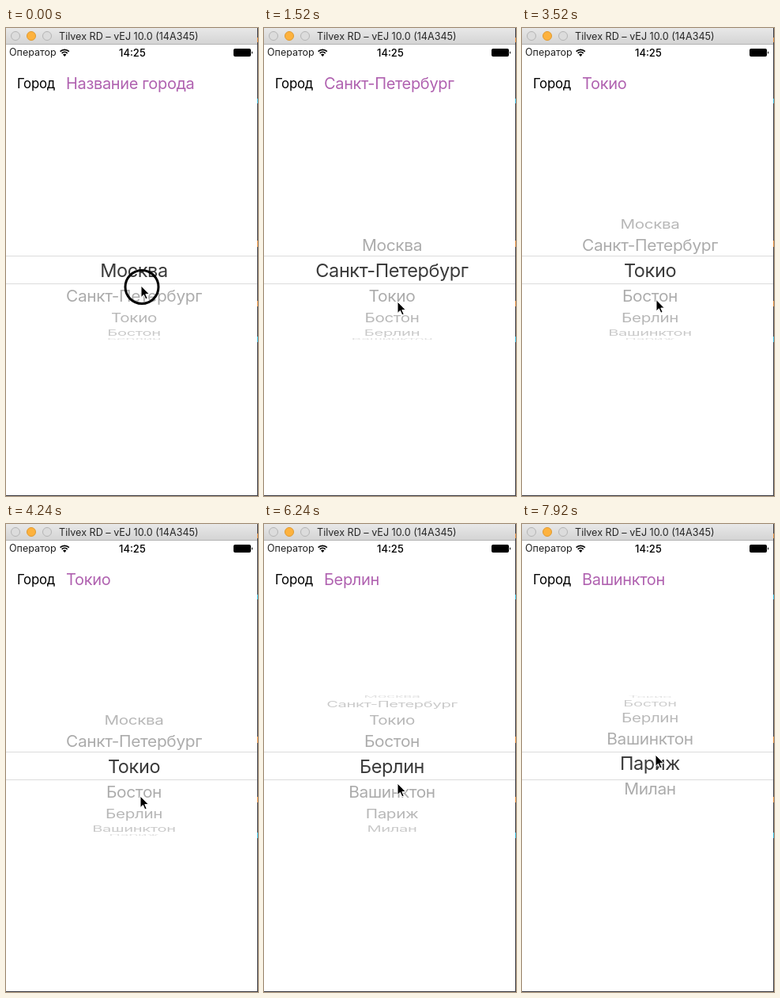
These frames come from a looping animation (319 by 590 pixels, 8000 ms). An HTML page:

```html
<!DOCTYPE html>
<html lang="ru">
<head>
<meta charset="utf-8">
<style>
html, body { margin: 0; width: 100%; height: 100%; overflow: hidden; background: #fff; }
body { position: relative; font-family: Inter, Roboto, sans-serif; color: #000; }
svg, .text, .wheel, .lens, .row { position: absolute; }
svg { left: 0; top: 0; }
.text { transform: translateY(-50%); white-space: nowrap; line-height: 1; }
.wheel { left: 0; top: 216px; width: 318px; height: 177px; overflow: hidden; }
.lens { left: 0; top: 287px; width: 318px; height: 34px; overflow: hidden; background: #fff;
  border: solid #dcdcdc; border-width: 1px 0; }
.row { left: 162px; white-space: nowrap; line-height: 1; font-size: 21px; letter-spacing: -.017em; }
.lens .row { font-size: 23.5px; color: #3a3a3a; }
#city { left: 76px; top: 69.5px; font-size: 20px; color: #b062b0; letter-spacing: -.017em; }
</style>
</head>
<body>
<svg width="319" height="590">
  <defs><linearGradient id="bar" x2="0" y2="1"><stop stop-color="#e8e8e8"/><stop offset="1" stop-color="#d4d4d4"/></linearGradient></defs>
  <path d="M0 0H318V20H0Z" fill="url(#bar)"/>
  <path d="M0 20.5H318" stroke="#b4b4b4"/>
  <g fill="#dcdcdc" stroke="#b5b5b5">
    <circle cx="12" cy="10" r="5.5"/>
    <circle cx="32" cy="10" r="5.5" fill="#fdb23e" stroke="#e09a30"/>
    <circle cx="52" cy="10" r="5.5"/>
  </g>
  <path d="M318.5 0V590M0 589.5H319" stroke="#3a3a42"/>
  <path d="M318.5 12v6M318.5 268v8M318.5 344v7" stroke="#e08a3c"/>
  <path d="M318.5 89v6M318.5 389v7" stroke="#2fb4d8"/>
  <path d="M68.6 29.6a8 8 0 0 1 11.2 0M70.7 31.9a5 5 0 0 1 7 0" fill="none" stroke="#000" stroke-width="1.7"/>
  <path d="M74.2 36l-2.2-2.4a3.2 3.2 0 0 1 4.4 0z"/>
  <rect x="288" y="26" width="22" height="10" rx="2"/>
  <path d="M311 29.2a2 2 0 0 1 0 3.6z"/>
</svg>
<div class="text" style="left:67px;top:10.5px;font-size:12.6px;color:#262626">Tilvex RD – vEJ 10.0 (14A345)</div>
<div class="text" style="left:4px;top:31px;font-size:12.5px;color:#222">Оператор</div>
<div class="text" style="left:143px;top:31px;font-size:13px;font-weight:500">14:25</div>
<div class="text" style="left:14px;top:69.5px;font-size:16.8px;letter-spacing:-.017em">Город</div>
<div class="text" id="city"></div>
<div class="wheel"></div>
<div class="lens"></div>
<svg width="319" height="590">
  <g id="pointer">
    <circle id="ring" cx="1" cy="1.5" r="21" fill="none" stroke="#000" stroke-width="3"/>
    <path d="M0 0V14.5L3.4 11.4L5.8 16.8L8.2 15.8L5.8 10.6H10.4Z" stroke="#fff"/>
  </g>
</svg>
<script>
const cities = ['Москва', 'Санкт-Петербург', 'Токио', 'Бостон', 'Берлин', 'Вашинктон', 'Париж', 'Милан'];
const MID = 305.7, RADIUS = 96, ANGLE = .34;          // wheel shape
const DELAY = 160, PULL = 240, SETTLE = 240;          // gesture timing, ms
const SLOP = 8, ROW = 31.7;                           // drag distance, px
const $ = s => document.querySelector(s);

// each drag turns the wheel one city further
const drags = [
  { down: -80, up: 720, x: 171, y: 325, pull: 26 },
  { down: 1980, up: 2640, x: 169, y: 345, pull: 30 },
  { down: 4240, up: 4640, x: 170, y: 343, pull: 33 },
  { down: 5120, up: 5680, x: 176, y: 342, pull: 26 },
  { down: 6240, up: 6640, x: 169, y: 327, pull: 27 },
  { down: 7360, up: 7920, x: 169, y: 334, pull: 43 },
];

const mix = (a, b, u) => a + (b - a) * u;
function ease(t, start, length) {
  const u = Math.min(1, Math.max(0, (t - start) / length));
  return u * u * (3 - 2 * u);
}

function addRows(box) {
  return cities.map(name => {
    const row = document.createElement('div');
    row.className = 'row';
    row.textContent = name;
    return box.appendChild(row);
  });
}
const outer = addRows($('.wheel')), inner = addRows($('.lens'));

function place(row, y, sx, sy) {
  row.style.top = y + 'px';
  row.style.transform = `translate(-50%, -50%) scale(${sx}, ${sy})`;
}

function drawWheel(pos) {
  cities.forEach((_, i) => {
    const angle = (i - pos) * ANGLE, c = Math.cos(angle);
    const scale = 1 / (1 + .09 * (1 - c)), y = MID + RADIUS * Math.sin(angle) * scale;
    outer[i].hidden = inner[i].hidden = c <= 0;
    place(outer[i], y - 216, scale, scale * c);
    outer[i].style.opacity = .06 + .28 * c;
    place(inner[i], y - 288, 1, c);
  });
}

function draw(t) {
  const i = drags.findLastIndex(d => d.down <= t), d = drags[i], next = drags[i + 1] || d;
  const moved = d.pull * ease(t, d.down + DELAY, PULL);
  const turned = i + Math.max(0, moved - SLOP) / ROW;
  drawWheel(mix(turned, i + 1, ease(t, d.up, SETTLE)));

  const chosen = t < d.up + SETTLE ? i : i + 1;
  $('#city').textContent = chosen ? cities[chosen] : 'Название города';

  // after release the pointer glides to the next grab point
  const back = ease(t, d.up, .6 * (next.down - d.up));
  const x = mix(d.x, next.x, back), y = mix(d.y - moved, next.y, back);
  $('#pointer').setAttribute('transform', `translate(${x} ${y})`);
  $('#ring').style.display = t > d.down && t < d.up ? '' : 'none';
}

function tick() {
  draw(Math.floor(performance.now() % 8000 / 80) * 80);
  requestAnimationFrame(tick);
}
tick();
</script>
</body>
</html>
```
